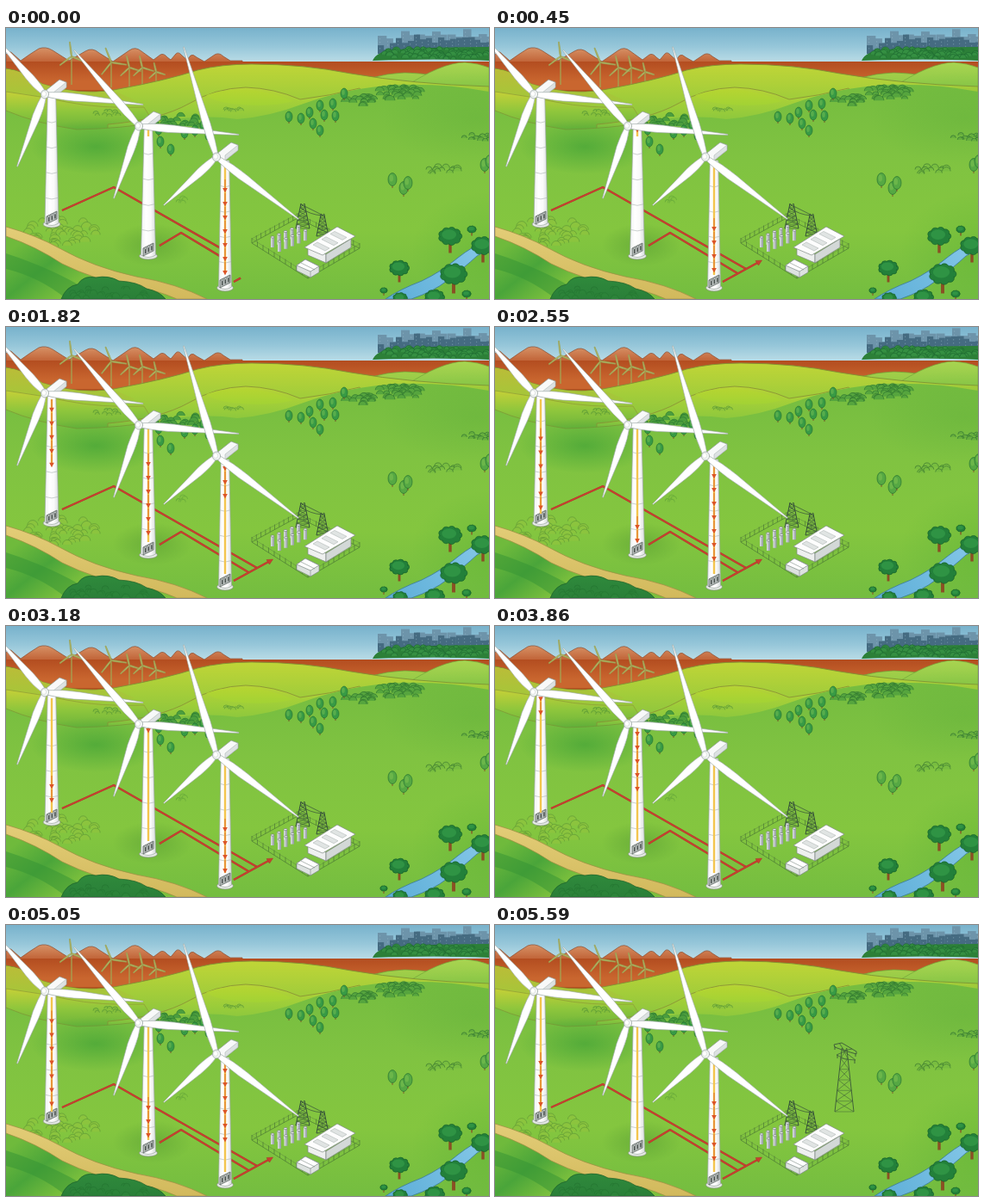
An HTML page with a canvas for the animation above (5.63 s loop, 560x315 px).

```html
<!DOCTYPE html>
<html lang="en">
<head>
<meta charset="utf-8">
<title>Wind farm</title>
<style>
html, body { margin: 0; width: 100%; height: 100%; overflow: hidden; }
canvas { display: block; width: 560px; height: 315px; }
</style>
</head>
<body>
<canvas id="stage"></canvas>
<script>
const W = 560, H = 315, LOOP = 5630;
const PERIOD = 2700, TRAIN = 98, GAP = 16;
const scale = window.devicePixelRatio || 1;
const RED = '#c9402f', YELLOW = '#f3c54f';
let g;

function layer(canvas) {
  canvas.width = W * scale;
  canvas.height = H * scale;
  const ctx = canvas.getContext('2d');
  ctx.scale(scale, scale);
  ctx.lineJoin = 'round';
  return ctx;
}

let seed = 7;
function rnd() {
  seed = (seed * 16807) % 2147483647;
  return seed / 2147483647;
}

function fade(x0, y0, x1, y1, ...colors) {
  const grad = g.createLinearGradient(x0, y0, x1, y1);
  colors.forEach((c, i) => grad.addColorStop(i / (colors.length - 1), c));
  return grad;
}

function paint(fill, stroke, width = 0.7) {
  if (fill) { g.fillStyle = fill; g.fill(); }
  if (stroke) { g.strokeStyle = stroke; g.lineWidth = width; g.stroke(); }
}

function path(d, fill, stroke, width = 0.7) {
  const p = new Path2D(d);
  if (fill) { g.fillStyle = fill; g.fill(p); }
  if (stroke) { g.strokeStyle = stroke; g.lineWidth = width; g.stroke(p); }
}

function line(x0, y0, x1, y1, color, width = 0.7) {
  g.beginPath();
  g.moveTo(x0, y0);
  g.lineTo(x1, y1);
  paint(null, color, width);
}

function oval(x, y, rx, ry, fill, stroke, width) {
  g.beginPath();
  g.ellipse(x, y, rx, ry, 0, 0, Math.PI * 2);
  paint(fill, stroke, width);
}

function glow(x, y, rx, ry, rgb, alpha) {
  g.save();
  g.translate(x, y);
  g.scale(rx, ry);
  const grad = g.createRadialGradient(0, 0, 0, 0, 0, 1);
  grad.addColorStop(0, `rgba(${rgb},${alpha})`);
  grad.addColorStop(1, `rgba(${rgb},0)`);
  g.fillStyle = grad;
  g.fillRect(-1, -1, 2, 2);
  g.restore();
}

function tree(x, y, r) {
  g.fillStyle = '#8a4f24';
  g.fillRect(x - r * 0.13, y + r * 0.5, r * 0.26, r);
  for (let i = 0; i < 9; i++) {
    const a = i * 0.7;
    oval(x + Math.cos(a) * r * 0.72, y + Math.sin(a) * r * 0.52, r * 0.34, r * 0.3, '#23803a', '#145b28', 0.6);
  }
  oval(x, y, r * 0.88, r * 0.68, '#23803a');
  oval(x - r * 0.1, y - r * 0.15, r * 0.65, r * 0.45, '#2f9344');
}

function sapling(x, y, r, fill) {
  line(x, y, x, y + r * 2, '#7d5228', 0.9);
  oval(x, y, r, r * 1.5, fill, '#1f6a30', 0.6);
  oval(x - r * 0.25, y - r * 0.3, r * 0.45, r * 0.8, 'rgba(150,210,90,.35)');
}

// A patch of small domed shrubs inside an ellipse, back to front.
function shrubs(x, y, rx, ry, n, size, fill, edge) {
  const spots = [];
  for (let i = 0; i < n; i++) {
    const a = rnd() * 6.28, d = Math.sqrt(rnd());
    spots.push([x + Math.cos(a) * d * rx, y + Math.sin(a) * d * ry]);
  }
  spots.sort((a, b) => a[1] - b[1]);
  for (const [sx, sy] of spots) {
    const s = size * (0.7 + rnd() * 0.5);
    g.beginPath();
    g.arc(sx, sy, s, Math.PI, 0);
    paint(fill, edge, 0.6);
  }
}

function blade(x, y, tx, ty, width, fill, edge) {
  const len = Math.hypot(tx - x, ty - y);
  g.save();
  g.translate(x, y);
  g.rotate(Math.atan2(ty - y, tx - x));
  g.beginPath();
  g.moveTo(0, -width * 0.25);
  g.quadraticCurveTo(len * 0.18, -width * 0.62, len * 0.35, -width * 0.5);
  g.lineTo(len, -0.5);
  g.lineTo(len, 0.5);
  g.lineTo(len * 0.3, width * 0.5);
  g.quadraticCurveTo(len * 0.12, width * 0.5, 0, width * 0.25);
  g.closePath();
  paint(fill, edge, 0.6);
  g.restore();
}

function farTurbine(x, y, base, r, turn) {
  line(x, y, x, base, '#a3a553', 1.3);
  for (let i = 0; i < 3; i++) {
    const a = turn + i * 2.094;
    blade(x, y, x + Math.cos(a) * r, y + Math.sin(a) * r, 1.7, '#b0b564', '#96a052');
  }
}

function sky() {
  g.fillStyle = fade(0, 0, 0, 42, '#78b2cc', '#95c6d9', '#bfdfe8');
  g.fillRect(0, 0, W, 60);
  for (const [step, top, color] of [[9, 0, '#6d94aa'], [7, 7, '#456b81']]) {
    for (let x = 431; x < W; x += step) {
      const h = top + rnd() * 11 + (x < 450 ? 9 : 0);
      g.fillStyle = color;
      g.fillRect(x, h, step - 0.5 + rnd() * 2, 30 - h);
      g.fillStyle = 'rgba(160,195,210,.35)';
      for (let y = h + 3; y < 24; y += 4) g.fillRect(x + 2, y, 1.2, 1.4);
    }
  }
}

function hills() {
  path('M0 31Q4 25 8 30L17 38Q28 30 38 24Q46 21 54 26L73 38L92 27Q100 22 108 29L124 39L143 26Q150 21 157 27L171 37L179 31Q183 29 187 34L191 37L197 30Q200 27 204 32L210 37L214 32Q217 30 221 34L230 39L242 31Q247 28 252 33L260 38H274V75H0Z',
    fade(0, 22, 0, 58, '#d89468', '#c06236', '#b4501f'), '#8c4a2c', 0.7);
  path('M0 39H560V72H0Z', fade(0, 39, 0, 62, '#b34d20', '#c9662f'));
  path('M425 38Q430 26 455 25Q500 22 560 22V38Q500 35 425 38Z', '#2c8038');
  shrubs(494, 31, 66, 6, 80, 4, '#358f42', '#1c6530');
  farTurbine(76, 33, 66, 17, 0.4);
  farTurbine(122, 40, 69, 18, 0.15);
  farTurbine(143, 46, 70, 14, 0.3);
  farTurbine(158, 46, 70, 14, 0.3);
  farTurbine(174, 51, 67, 11, 0.3);

  path('M400 66Q445 48 480 53Q515 58 560 52V110H400Z', fade(0, 50, 0, 85, '#a5d04a', '#7cc142'), '#6f9d35');
  path('M460 70Q505 40 532 40Q548 41 560 46V105H440Z', fade(0, 40, 0, 85, '#a9d450', '#7cc142'), '#73a73a');
  path('M0 47Q22 50 42 65Q85 79 125 72Q186 61 222 49Q250 42 285 42Q345 42 400 53Q470 65 560 68V140H0Z',
    fade(0, 42, 0, 115, '#c0d537', '#a3cd3a', '#86c33f'), '#7f9434', 0.9);
  path('M0 48Q22 50 42 65Q85 79 125 73L150 84Q80 100 0 74Z', fade(0, 50, 0, 90, '#b9bd38', '#9fc93a'));
  path('M0 74Q38 79 70 86Q110 94 160 92L190 140H0Z', fade(0, 76, 0, 118, '#c0cf38', '#8fc63c', '#6cb43b'), '#8d9a36');
  path('M118 112Q178 107 212 88Q242 70 278 69Q311 70 341 83Q375 79 410 70L450 130H118Z',
    fade(0, 69, 0, 119, '#b8d336', '#9bcd3a', '#80c240'), '#8c9436', 0.9);
  path('M232 78Q280 62 333 85Q306 93 262 88Q240 85 232 78Z', fade(0, 70, 0, 92, '#b7d531', '#a0d235'));
}

function field() {
  path('M0 96Q35 111 82 118Q133 117 180 109Q225 100 268 106Q306 103 345 88Q395 70 451 66Q510 64 560 74V315H0Z',
    fade(0, 75, 0, 315, '#76bd40', '#80c341', '#84c63f', '#74bd40'));
  path('M0 96Q35 111 82 118Q133 117 180 109', null, '#7e9837', 0.8);
  glow(104, 138, 75, 32, '42,150,50', 0.5);
  glow(170, 252, 46, 25, '70,140,45', 0.4);
  glow(545, 105, 110, 55, '88,170,58', 0.3);
  glow(560, 260, 90, 70, '70,165,50', 0.3);

  shrubs(455, 77, 29, 8, 42, 5, '#56a53e', '#2b702f');
  shrubs(414, 86, 22, 5, 22, 4.5, '#56a53e', '#2b702f');
  shrubs(202, 111, 30, 9, 26, 4.5, '#4b9d3e', '#28752f');
  shrubs(117, 101, 18, 4, 9, 3.5, '#85bd3c', '#4d9035');
  shrubs(264, 97, 13, 3, 9, 3, '#8fc53e', '#589437');
  shrubs(498, 166, 28, 5, 14, 4, '#78bd40', '#35702f');
  shrubs(547, 129, 18, 5, 13, 4, '#66ae3d', '#2c6d33');
  shrubs(205, 201, 8, 3, 6, 3, '#83c440', '#60a33a');
  shrubs(65, 239, 40, 18, 50, 5.5, '#8bc43e', '#5a9336');

  const grove = [[328, 103], [342, 105], [352, 98], [356, 111], [364, 90], [369, 101], [379, 88],
    [382, 102], [392, 76], [364, 119], [179, 132], [191, 141], [207, 122], [219, 119], [229, 113], [235, 125], [177, 118]];
  for (const [x, y] of grove) sapling(x, y, 4, '#379a45');
  for (const [x, y] of [[448, 176], [461, 186], [466, 180], [555, 159], [561, 155]]) sapling(x, y, 5, '#55a843');
}

function foreground() {
  path('M560 246Q540 254 524 267Q505 283 482 294Q456 304 440 315H470Q496 306 511 294Q532 278 546 265L560 257Z',
    fade(440, 310, 560, 246, '#5daed8', '#86c8e8'), '#3f7f98', 0.9);
  for (const [x, y, r] of [[540, 234, 5], [515, 242, 13], [553, 253, 13], [456, 279, 11], [519, 286, 15],
    [497, 313, 11], [457, 314, 8], [438, 305, 4], [534, 309, 5]]) tree(x, y, r);
  path('M0 240Q38 254 77 274Q118 292 160 300L210 315H0Z', fade(0, 262, 50, 325, '#6fba3c', '#4aa53a', '#7cc03d'));
  path('M0 262Q55 280 95 305L70 315Q40 290 0 280Z', 'rgba(52,148,52,.5)');
  path('M0 231Q35 241 62 256Q101 278 151 289Q198 297 233 315H198Q171 303 145 300Q103 293 65 274Q35 254 0 242Z',
    fade(0, 230, 0, 315, '#e3cd78', '#d2b95c'), '#a08c42', 0.7);
  path('M64 315Q70 300 83 298Q90 287 104 290Q119 287 131 294Q152 295 163 303Q178 306 185 315Z',
    fade(0, 288, 0, 315, '#2f8a3c', '#2a7f38'), '#1c6029');
  shrubs(118, 312, 46, 10, 32, 4, '#2c8339', '#247432');
}

function lattice(cx, top, base, half, color) {
  const tip = half * 0.25;
  line(cx - tip, top, cx - half, base, color, 1);
  line(cx + tip, top, cx + half, base, color, 1);
  const n = 6;
  for (let i = 0; i < n; i++) {
    const a = i / n, b = (i + 1) / n;
    const wa = tip + (half - tip) * a, wb = tip + (half - tip) * b;
    const ya = top + (base - top) * a, yb = top + (base - top) * b;
    line(cx - wa, ya, cx + wb, yb, color, 0.6);
    line(cx + wa, ya, cx - wb, yb, color, 0.6);
    line(cx - wb, yb, cx + wb, yb, color, 0.5);
  }
}

function substation() {
  const corners = [[285, 250], [338, 221], [410, 256], [350, 291]];
  corners.forEach(([x, y], i) => {
    const [u, v] = corners[(i + 1) % 4];
    line(x, y, u, v, '#4d7a35', 0.7);
    line(x, y - 5, u, v - 5, '#5f8b40', 0.5);
    for (let k = 0; k < 10; k++) {
      const px = x + (u - x) * k / 10, py = y + (v - y) * k / 10;
      line(px, py, px, py - 6, '#4d7a35', 0.7);
    }
  });
  lattice(344, 204, 233, 8, '#35503a');
  lattice(367, 216, 242, 7, '#35503a');
  path('M341 205L348 208L370 219M342 209Q352 217 367 218', null, '#35503a', 0.7);
  for (let row = 0; row < 2; row++) for (let i = 0; i < 5; i++) {
    const x = 309 + i * 7.5 + row * 8, y = 249 - i * 3.2 + row * 5;
    g.fillStyle = fade(x - 2, 0, x + 2, 0, '#dfe2e6', '#8f979e');
    g.fillRect(x - 2, y - 6, 4, 12);
    oval(x, y - 6, 2, 1.1, '#eef0f2', '#66706f', 0.6);
  }
  // control building
  path('M350 255L371 263V273L350 264Z', '#eef0ef', '#7f8985');
  path('M371 263L400 245V255L371 273Z', '#d3d8d7', '#7f8985');
  path('M346 255L384 231L405 242L367 264Z', '#fdfdfd', '#7f8985');
  for (let i = 0; i < 3; i++) {
    const x = 356 + i * 10, y = 252 - i * 6.3;
    path(`M${x} ${y}L${x + 5} ${y - 3}L${x + 19} ${y + 4}L${x + 14} ${y + 7}Z`, '#e0e4e3', '#a6afac', 0.5);
  }
  // transformers
  path('M337 276L347 269L363 277V284L353 290L337 282Z', '#dde2e0', '#7c8984');
  path('M337 276L347 269L363 277L353 283Z', '#fff', '#7c8984');
  path('M342 273L358 281M353 283V290', null, '#7c8984', 0.6);
}

// "start" is when the first train of arrows leaves the hub, "speed" is in px per ms.
const turbines = [
  { x: 53, top: 79, base: 227, hub: [45, 77], tips: [[-10, 14], [159, 89], [13, 161]], from: 84, to: 217, start: 980, speed: 0.09, w: 8 },
  { x: 165, top: 116, base: 264, hub: [154, 114], tips: [[79, 26], [270, 124], [125, 198]], from: 118, to: 250, start: 450, speed: 0.1, w: 8.5 },
  { x: 254, top: 154, base: 301, hub: [244, 150], tips: [[206, 22], [339, 222], [183, 206]], from: 154, to: 287, start: -1300, speed: 0.1, w: 7.5 }
];

function towerBody(t) {
  const { x, top, base, w } = t;
  oval(x, base + 1, w + 2, 4, '#e6eae6', '#84917f');
  path(`M${x - 4.8} ${top}L${x - w} ${base}Q${x} ${base + 5} ${x + w} ${base}L${x + 4.8} ${top}Z`,
    fade(x - w, 0, x + w, 0, '#eef1f1', '#ffffff', '#fafafa', '#d8dddd'), '#9ca7a3');
  for (let i = 1; i < 5; i++) {
    const k = i / 5, y = top + (base - top) * k, r = 4.8 + (w - 4.8) * k;
    path(`M${x - r} ${y}Q${x} ${y + 3} ${x + r} ${y}`, null, '#a9b2b0', 0.6);
  }
  path(`M${x - 6} ${base - 8}L${x + 6} ${base - 14}V${base - 5}L${x - 6} ${base + 1}Z`, '#b4bab8', '#505955');
  for (let i = 0; i < 3; i++) {
    const px = x - 4 + i * 3.6, py = base - 7 - i * 1.8;
    g.fillStyle = '#4b5350';
    g.fillRect(px, py, 1.5, 5);
    oval(px + 0.7, py - 1, 1.2, 1.2, '#d5dbd8', '#4b5350', 0.5);
  }
}

function rotor(t) {
  const [x, y] = t.hub;
  path(`M${x + 2} ${y - 5}L${x + 17} ${y - 17}L${x + 25} ${y - 14}V${y - 8}L${x + 10} ${y + 4}L${x + 1} ${y + 3}Z`,
    '#f8f9f9', '#8f9a98');
  path(`M${x + 10} ${y - 2}L${x + 25} ${y - 14}V${y - 8}L${x + 10} ${y + 4}Z`, '#dde2e2', '#a5afad', 0.5);
  for (const [tx, ty] of t.tips)
    blade(x, y, tx, ty, 9, fade(x, y - 4, x + 5, y + 7, '#ffffff', '#f6f7f8', '#e6eaea'), '#9ba7a5');
  oval(x, y, 4.6, 5, '#f2f5f4', '#929e9b');
  oval(x - 1, y - 0.5, 2.6, 3, '#ffffff', '#c5cdca', 0.5);
}

// Strokes the first part of a polyline, up to the given share of its length.
function cable(points, share) {
  const lens = points.slice(1).map((p, i) => Math.hypot(p[0] - points[i][0], p[1] - points[i][1]));
  let left = lens.reduce((a, b) => a + b) * share;
  g.beginPath();
  g.moveTo(...points[0]);
  lens.forEach((len, i) => {
    if (left <= 0) return;
    const k = Math.min(1, left / len), [x, y] = points[i], [u, v] = points[i + 1];
    g.lineTo(x + (u - x) * k, y + (v - y) * k);
    left -= len;
  });
  paint(null, '#a33a2b', 2.4);
  paint(null, RED, 1.5);
}

function cables(t) {
  const k = Math.min(1, t / 420);
  cable([[65, 212], [125, 185], [291, 280]], 0.83 + 0.17 * k);
  cable([[178, 253], [203, 238], [281, 285]], 0.76 + 0.24 * k);
  cable([[264, 295], [306, 272]], 0.19 + 0.81 * k);
  if (k === 1) path('M309.5 270L302 270.5L305.5 276Z', RED, '#a33a2b', 0.5);
}

function flow({ x, from, to, start, speed }, t) {
  const age = t - start;
  if (age < -450) return;
  const reach = Math.max(from + 8, from + age * speed);
  line(x, from, x, Math.min(to, reach), YELLOW, 2.4);
  if (age < 0) return;
  const head = from + (age % PERIOD) * speed;
  for (let y = head; y >= head - TRAIN; y -= GAP) {
    if (y > to || y < from) continue;
    line(x, Math.max(from, y - GAP + 4), x, y, '#e58a35', 1.6);
    path(`M${x - 2.8} ${y - 2}H${x + 2.8}L${x} ${y + 3.5}Z`, '#dc5428');
  }
}

function pylon() {
  const c = '#41623a';
  lattice(405, 143, 217, 11, c);
  path('M393 139L402 137L419 147L419 150L405 146L394 142Z', null, c, 1);
  path('M399 137L405 146L414 144M396 151L405 147L418 157L406 156Z', null, c, 0.8);
  for (const [x, y] of [[394, 141], [418, 149], [397, 151], [417, 157]]) line(x, y, x, y + 4, c, 1);
}

function bake(draw) {
  const canvas = document.createElement('canvas');
  g = layer(canvas);
  draw();
  return canvas;
}

const land = bake(() => { sky(); hills(); field(); foreground(); });
const towers = bake(() => { substation(); turbines.forEach(towerBody); });
const rotors = bake(() => turbines.forEach(rotor));
const mast = bake(pylon);
const stage = layer(document.getElementById('stage'));

function stamp(canvas, alpha = 1) {
  if (alpha <= 0) return;
  g.globalAlpha = Math.min(1, alpha);
  g.drawImage(canvas, 0, 0, W, H);
  g.globalAlpha = 1;
}

const born = performance.now();
function frame() {
  const t = (performance.now() - born) % LOOP;
  g = stage;
  stamp(land);
  cables(t);
  stamp(mast, (t - 5250) / 300);
  stamp(towers);
  for (const turbine of turbines) flow(turbine, t);
  stamp(rotors);
  requestAnimationFrame(frame);
}
frame();
</script>
</body>
</html>
```
